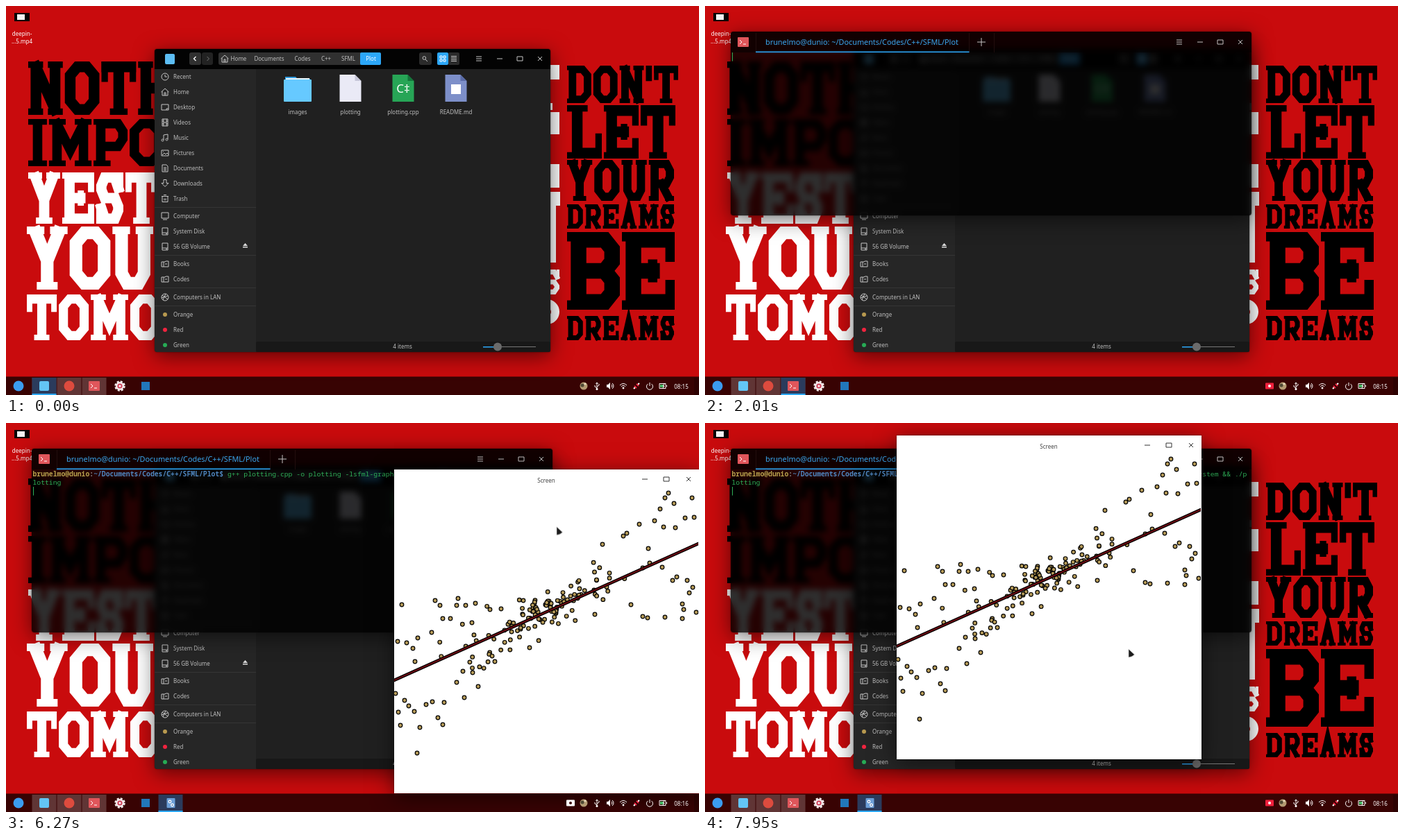
Recreate the animation shown at these times as an HTML page with a canvas. Size 998 px wide and 561 px high, loop 8000 ms.

```html
<!DOCTYPE html>
<html lang="en">
<head>
<meta charset="utf-8">
<title>Desktop plotting session</title>
<style>
html, body { margin: 0; width: 100%; height: 100%; overflow: hidden; background: #c90b0d; }
#stage { position: absolute; left: 0; top: 0; width: 998px; height: 561px; overflow: hidden; }
#stage > * { position: absolute; left: 0; top: 0; }
svg { display: block; overflow: visible; }
text { font: 8px "Noto Sans", "Open Sans", sans-serif; fill: #bdbdbd; white-space: pre; }
.mid { text-anchor: middle; }
.line { fill: none; stroke: #c4c4c4; stroke-width: 1; }
.mono { font: 9.74px "Noto Sans Mono", "DejaVu Sans Mono", monospace; fill: #2fae57; }
.bold { font-weight: bold; }
#stage > .panel { border-radius: 4px; box-shadow: 0 6px 30px rgba(0,0,0,.55), 0 0 2px rgba(0,0,0,.6); }
#files { left: 214px; top: 62px; width: 570px; height: 437px; background: #202020; }
#glass { left: 37px; top: 37px; width: 750px; height: 265px; background: rgba(0,0,0,.82); backdrop-filter: blur(4px); }
#plot { width: 438.5px; height: 467px; background: #fff; transform-origin: 50% 50%; }
#stage > #plot { border-radius: 0; }
#plot > * { position: absolute; left: 0; top: 0; }
#menu text { fill: #222; }
#menu .on text { fill: #fff; }
#menu .off { fill: #6b6e6b; }
</style>
</head>
<body>
<svg width="0" height="0" style="position:absolute"><defs>
  <path id="clock" d="M-5 0a5 5 0 1 0 10 0a5 5 0 1 0-10 0M0-3V0H3"/>
  <path id="home" d="M-5.5 0L0-5L5.5 0M-4-1V5H4V-1M-1 5V1H1V5"/>
  <path id="desktop" d="M-5-4H5V4H-5ZM2 4V2H5"/>
  <path id="film" d="M-4-5H4V5H-4ZM-2-5V5M2-5V5M-2 0H2M-4-2H-2M-4 2H-2M2-2H4M2 2H4"/>
  <path id="note" d="M-2 3V-4L4-5V2M-5 3.5a1.5 1.5 0 1 0 3 0a1.5 1.5 0 1 0-3 0M1 2.5a1.5 1.5 0 1 0 3 0a1.5 1.5 0 1 0-3 0"/>
  <path id="image" d="M-5-4H5V4H-5ZM-4 3L-1 0L1 2L3 0L5 2M-3-2h1"/>
  <path id="page" d="M-4-5H2L4-3V5H-4ZM-2-1H2M-2 1H2M-2 3H2"/>
  <path id="down" d="M-2-5H2V0H5L0 5L-5 0H-2Z"/>
  <path id="bin" d="M-5-3H5M-4-3V5H4V-3M-2-5H2M-1 0V3M1 0V3"/>
  <path id="screen" d="M-5-5H5V3H-5ZM-3 5H3"/>
  <path id="disk" d="M-4-5H4V5H-4ZM-4 2H4M1 3.5H3"/>
  <path id="folder" d="M-5-3H0L1-4H5V4H-5ZM-2-3V4M0 0H3"/>
  <path id="globe" d="M-5 0a5 5 0 1 0 10 0a5 5 0 1 0-10 0M-4-3L4 3M-3 4L1-5M-5 1L4-2"/>
  <path id="bars" d="M-4-3H4M-4 0H4M-4 3H4"/>
  <path id="min" d="M-4 0H4"/>
  <path id="max" d="M-4-3H4V3H-4Z"/>
  <path id="close" d="M-3-3L3 3M3-3L-3 3"/>
  <path id="right" d="M-1.5-3L1.5 0L-1.5 3"/>
</defs></svg>
<div id="stage">
  <canvas id="wall" width="998" height="561"></canvas>
  <svg id="desk" width="998" height="561"></svg>
  <div id="files" class="panel"></div>
  <svg id="fileView" width="998" height="561"></svg>
  <svg id="menu" width="998" height="561"></svg>
  <div id="glass" class="panel term"></div>
  <svg id="shell" class="term" width="998" height="561"></svg>
  <div id="plot" class="panel">
    <canvas width="438" height="467"></canvas>
    <svg width="438" height="467"></svg>
  </div>
  <svg id="dock" width="998" height="561"></svg>
  <svg id="mouse" width="1" height="1">
    <path class="pointer" d="M0 0V12Q5 11.5 8.5 8Z" fill="#1c1c1c" stroke="#ddd" stroke-width=".6"/>
    <path class="mover" d="M-6 0H6M0-6V6M-4-2L-6 0L-4 2M4-2L6 0L4 2M-2-4L0-6L2-4M-2 4L0 6L2 4" fill="none" stroke="#111" stroke-width="1.8"/>
  </svg>
</div>
<script>
const $ = s => document.querySelector(s);
const BLUE = '#2ca7f8';
const rect = (x, y, w, h, fill, r = 0) => `<rect x="${x}" y="${y}" width="${w}" height="${h}" fill="${fill}" rx="${r}"/>`;
const dot = (x, y, r, fill) => `<circle cx="${x}" cy="${y}" r="${r}" fill="${fill}"/>`;
const label = (x, y, s, cls = '', extra = '') => `<text x="${x}" y="${y + 3}" class="${cls}" ${extra}>${s}</text>`;
const icon = (id, x, y, extra = '') => `<use href="#${id}" x="${x}" y="${y}" class="line" ${extra}/>`;
const path = (d, x, y, extra = '') => `<path d="${d}" transform="translate(${x} ${y})" class="line" ${extra}/>`;
const promptIcon = (x, y) => rect(x - 8, y - 7, 16, 14, '#e0565b', 1) +
  path('M-5-3L-2 0L-5 3M0 3H4', x, y, 'style="stroke:#fff"');

/* ---------- wallpaper lettering ---------- */
const stem = 'M1 0V10', twin = stem + 'M9 0V10', bowl = 'M1 0H8L10 2V4L8 6H1';
const strokes = {
  N: twin + 'M1 0L9 10', H: twin + 'M1 5H9', M: twin + 'M1 0L5 7L9 0',
  O: 'M3 0H7L10 2V8L7 10H3L0 8V2Z', D: 'M1 0V10H7L10 8V2L7 0Z',
  T: 'M0 0H10M5 0V10', I: 'M5 0V10', L: 'M2 0V10H10',
  P: stem + bowl, R: stem + bowl + 'M5 6L9 10',
  B: stem + 'M1 0H8L10 1.5V3.5L8 5L10 6.5V8.5L8 10H1M1 5H8',
  E: stem + 'M1 0H10M1 5H6M1 10H10', A: 'M1 10L5 0L9 10M3 7H7',
  S: 'M10 2.5L8 0H2L0 2V3L2 5H8L10 7V8L8 10H2L0 7.5',
  U: 'M1 0V8L3 10H7L9 8V0', Y: 'M1 0L5 5.5L9 0M5 5.5V10', "'": 'M5 0V2L4 3'
};
const tops = 'M0 0H3M7 0H10', feet = 'M0 10H3M7 10H10', left = 'M0 0H2M0 10H2', base = 'M3 10H7';
const serifs = {
  N: tops + feet, H: tops + feet, M: tops + feet, A: feet, U: tops, Y: tops + base,
  T: 'M0 0V3M10 0V3' + base, I: 'M0 0H10M0 10H10', L: 'M0 0H5M0 10H2M10 10V6',
  P: left + 'M0 10H4', R: left + 'M8 10H10', B: left, D: left,
  E: left + 'M10 0V3M10 10V7M6 4V6', S: 'M10 0V3M0 10V7'
};
const span = { I: .55, M: 1.25, S: .85, "'": .25 };
const wall = $('#wall').getContext('2d');

function inkGlyph(d, x, y, w, h, weight) {
  const p = new Path2D(), m = new DOMMatrix([(w - weight) / 10, 0, 0, (h - weight) / 10, x + weight / 2, y + weight / 2]);
  p.addPath(new Path2D(d), m);
  wall.lineWidth = weight;
  wall.stroke(p);
}
function letterRow(word, x, y, right, bottom, color) {
  const gap = 3, h = bottom - y, units = [...word].map(c => span[c] || 1);
  const unit = (right - x - gap * (word.length - 1)) / units.reduce((a, b) => a + b);
  wall.strokeStyle = color;
  wall.lineCap = 'square';
  [...word].forEach((c, i) => {
    const w = unit * units[i];
    inkGlyph(strokes[c], x, y, w, h, Math.min(h * .2, w));
    if (serifs[c]) inkGlyph(serifs[c], x, y, w, h, h * .12);
    x += w + gap;
  });
}
wall.fillStyle = '#c90b0d';
wall.fillRect(0, 0, 998, 561);
letterRow('NOTH', 32, 80, 240, 157, '#000');
letterRow('IMPO', 32, 163, 227, 231, '#000');
letterRow('YEST', 32, 240, 218, 314, '#fff');
letterRow('YOU', 30, 318, 212, 409, '#fff');
letterRow('TOMO', 30, 416, 222, 482, '#fff');
letterRow("DON'T", 808, 86, 968, 140, '#000');
letterRow('LET', 808, 143, 964, 220, '#000');
letterRow('YOUR', 808, 222, 962, 281, '#000');
letterRow('DREAMS', 808, 286, 962, 321, '#000');
letterRow('BE', 808, 326, 963, 438, '#000');
letterRow('DREAMS', 808, 447, 962, 482, '#000');
letterRow('S', 770, 380, 797, 416, '#fff');
wall.fillStyle = '#fff';
for (const [y, w, h] of [[85, 17, 21], [140, 7, 10], [153, 17, 32], [228, 17, 34], [268, 18, 20], [288, 12, 82]])
  wall.fillRect(780, y, w, h);
wall.lineWidth = 12;
wall.beginPath();
wall.arc(779, 441, 12, -1.6, 1.2);
wall.stroke();

$('#desk').innerHTML = rect(12, 10, 22, 12, '#050505') + rect(16, 12, 11, 8, '#f4f4f4') +
  label(23, 40, 'deepin-', 'mid', 'style="fill:#fff"') + label(23, 51, '...5.mp4', 'mid', 'style="fill:#fff"');

/* ---------- file manager ---------- */
const controls = (xs, y, ink = '#c4c4c4') =>
  ['bars', 'min', 'max', 'close'].slice(-xs.length).map((id, i) => icon(id, xs[i], y, `style="stroke:${ink}"`)).join('');
const places = [
  ['Recent', 102, 'clock'], ['Home', 124, 'home'], ['Desktop', 146, 'desktop'], ['Videos', 168, 'film'],
  ['Music', 190, 'note'], ['Pictures', 212, 'image'], ['Documents', 234, 'page'], ['Downloads', 255.5, 'down'],
  ['Trash', 277.5, 'bin'], ['Computer', 303, 'screen'], ['System Disk', 325, 'disk'], ['56 GB Volume', 347, 'disk'],
  ['Books', 372, 'folder'], ['Codes', 394, 'folder'], ['Computers in LAN', 420, 'globe']
];
const tags = [['Orange', 445, '#b8994f'], ['Red', 467, '#f0243f'], ['Green', 489, '#27ab55']];
const crumbs = [['Home', 335], ['Documents', 379], ['Codes', 427], ['C++', 461], ['SFML', 493], ['Plot', 525.5]];
const sheet = (x, fill, fold) => `<path d="M${x} 99h22l9 9v30h-31z" fill="${fill}"/><path d="M${x + 22} 99v9h9z" fill="${fold}"/>`;

$('#fileView').innerHTML =
  `<path d="M214 499V66q0-4 4-4H780q4 0 4 4V91H214Z" fill="#030303"/>` +
  `<path d="M214 91H360V499H218q-4 0-4-4Z" fill="#262626"/>` +
  rect(360, 484, 424, 15, '#181818', 2) +
  rect(229, 69, 14, 15, '#5cbdf3', 2) +
  rect(264, 67, 17, 18, '#303030', 3) + rect(282, 67, 16, 18, '#222', 3) +
  path('M1.5-3L-1.5 0L1.5 3', 272, 76, 'style="stroke:#fff;stroke-width:1.3"') + icon('right', 291, 76, 'style="stroke:#777"') +
  rect(306, 67, 234, 18, '#303030', 3) + rect(510, 67, 30, 18, BLUE, 2) + icon('home', 315, 76) +
  crumbs.map(([s, x]) => label(x, 76, s, 'mid', s === 'Plot' ? 'style="fill:#fff"' : '')).join('') +
  rect(595, 67, 18, 18, '#2b2b2b', 3) + path('M-3-1a2.3 2.3 0 1 0 4.6 0a2.3 2.3 0 1 0-4.6 0M1 1L4 4', 603, 76) +
  rect(621, 67, 16, 18, BLUE, 2) + rect(637, 67, 16, 18, '#2b2b2b', 2) +
  path('M-4-4H-1V-1H-4ZM1-4H4V-1H1ZM-4 1H-1V4H-4ZM1 1H4V4H1Z', 629, 76, 'style="stroke:#fff"') +
  path('M-4-3.5H4M-4-1.2H4M-4 1.2H4M-4 3.5H4', 645, 76) + controls([681, 711, 740, 769], 76) +
  places.map(([s, y, id]) => icon(id, 229, y) + label(241, y, s)).join('') +
  tags.map(([s, y, c]) => dot(229, y, 3, c) + label(241, y, s)).join('') +
  [290, 359, 406, 432].map(y => rect(214, y, 146, 1, '#353535')).join('') +
  `<path d="M341 346L344.500 342L348 346ZM341 347h7v1.500h-7z" fill="#ddd"/>` +
  `<path d="M402 102h15l3 3h18v5h-36z" fill="#2f9be0"/>` + rect(403, 104, 34, 4, '#e8f6ff') + rect(400, 106, 40, 32, '#66c9ff', 1) +
  sheet(480.5, '#eaeaf6', '#c6c6d8') + sheet(556.5, '#27a556', '#14753a') + sheet(632.5, '#7d8fc9', '#596aa6') +
  label(572, 122, 'C‡', 'mid', 'style="font-size:17px;fill:#fff"') +
  rect(641, 113, 14, 14, '#fff') +
  [['images', 420], ['plotting', 496], ['plotting.cpp', 572], ['README.md', 648]].map(([s, x]) => label(x, 153, s, 'mid')).join('') +
  label(571, 491, '4 items', 'mid') + rect(687, 491, 76, 1, '#777') + rect(687, 491, 20, 1.5, BLUE) + dot(708, 491.5, 6, '#6b6b6b');

/* ---------- context menu ---------- */
const entries = [['New folder', 264], ['New document', 280, 1], ['Display as', 300, 1], ['Sort by', 316, 1],
  ['Open in new window as admin', 332], ['Open in terminal', 348], ['Paste', 368], ['Select all', 384], ['Properties', 404]];
$('#menu').innerHTML = `<g class="body">` + rect(506, 253, 157.5, 161, '#979a97', 3) +
  entries.map(([s, y, more], i) => (s === 'Paste' ? label(526, y, s, '', 'style="fill:#6b6e6b"') : label(526, y, s)) +
    (more ? icon('right', 657, y, 'style="stroke:#222"') : '') +
    (i < 6 ? `<g class="on row${i}">${rect(506, y - 8, 157.5, 16, BLUE)}${label(526, y, s)}</g>` : '')).join('') +
  `</g><g class="click">${dot(506, 253, 8, 'rgba(90,180,245,.55)')}</g>`;

/* ---------- terminal ---------- */
const user = 'brunelmo@dunio', cwd = '~/Documents/Codes/C++/SFML/Plot';
const mono = (y, s, cls, x = 38.5) => `<text class="mono ${cls}" x="${x}" y="${y}">${s}</text>`;
$('#shell').innerHTML =
  `<path d="M37 67V41q0-4 4-4H783q4 0 4 4V67Z" fill="rgba(0,0,0,.5)"/>` + promptIcon(55, 52) +
  [73, 380, 416].map(x => rect(x, 39, .7, 28, '#2a1414')).join('') + rect(73, 65.5, 307.5, 1.6, BLUE) +
  `<text x="87" y="56" style="font-size:10.87px;fill:#3aa6ee">${user}: ${cwd}</text>` +
  path('M-6 0H6M0-6V6', 398, 52) + controls([683, 713, 742, 771], 52) +
  `<g class="prompt">` + mono(76.5, `${user}<tspan fill="#8a8a8a">:</tspan><tspan fill="#4f86c0">${cwd}$</tspan>`, 'bold', 38.5).replace('class=', 'style="fill:#b59f4c" class=') + `</g>` +
  `<g class="short">${mono(76.5, './plotting', '', 319)}</g>` +
  `<g class="full">` + mono(76.5, 'g++ plotting.cpp -o plotting -lsfml-graphics -lsfml-window -lsfml-system &amp;&amp; ./p', '', 319) +
  mono(89, 'lotting', '') + `</g>` + `<g class="caret">${rect(0, 0, 1, 12.5, '#2fae57')}</g>`;

/* ---------- scatter plot ---------- */
const outliers = [
  11,195, 59,189, 66,196, 92,186, 90,196, 33,409, 6,350, 9,369, 15,333, 21,341, 29,349, 37,372,
  46,339, 55,335, 72,336, 63,358, 70,368, 101,329, 121,313, 90,307, 99,291, 113,293, 5,248, 18,250,
  27,258, 34,243, 30,277, 2,323, 54,235, 70,215, 81,215, 103,196, 117,193, 138,202, 154,201, 112,221,
  195,257, 145,277, 429,41, 432,69, 419,70, 403,49, 395,34, 390,41, 383,57, 375,74, 388,83, 405,84,
  353,79, 335,92, 330,96, 300,108, 366,114, 368,135, 358,142, 407,155, 401,160, 422,160, 425,178,
  430,170, 415,194, 417,202, 415,215, 435,206, 358,212, 365,214, 390,213, 386,141, 341,195, 289,209
];
const chart = $('#plot canvas').getContext('2d');
let seed = 11;
const random = () => (seed = seed * 16807 % 2147483647) / 2147483647;
const fit = x => 304 - x * 197 / 438;
function mark(x, y) {
  chart.beginPath();
  chart.arc(x, y, 2.8, 0, 7);
  chart.fill();
  chart.stroke();
}
chart.fillStyle = '#b59a58';
chart.strokeStyle = '#000';
chart.lineWidth = 1.2;
for (let i = 0; i < outliers.length; i += 2) mark(outliers[i], outliers[i + 1]);
for (let i = 0; i < 118; i++) {
  const x = 45 + 310 * (random() + random() + .6 * i / 118) / 2.6;
  mark(x, fit(x) + (random() + random() - 1) * (34 + 70 * Math.abs(x / 438 - .55)));
}
for (const [width, color] of [[4.4, '#0a0000'], [1.4, '#8a0d18']]) {
  chart.strokeStyle = color;
  chart.lineWidth = width;
  chart.beginPath();
  chart.moveTo(-2, fit(-2));
  chart.lineTo(440, fit(440));
  chart.stroke();
}
$('#plot svg').innerHTML = label(219, 16, 'Screen', 'mid', 'style="fill:#444"') + controls([361, 392, 424], 14, '#333') +
  `<g class="grab">${dot(230, 15, 6, 'rgba(90,180,245,.55)')}</g>`;

/* ---------- dock ---------- */
const tile = x => rect(x - 17.5, 536, 35, 25, 'rgba(255,255,255,.2)');
const active = (x, cls) => `<g class="${cls}">${rect(x - 17.5, 536, 35, 25, '#2b3b5c')}${rect(x - 17.5, 559, 35, 2, BLUE)}</g>`;
const camera = (cls, fill, lens) => `<g class="${cls}">${rect(807, 543.5, 12, 9, fill, 1)}${dot(813, 548, 2, lens)}</g>`;
const white = 'style="stroke:#fff"';
$('#dock').innerHTML = rect(0, 534.5, 998, 27, 'rgba(0,0,0,.72)') + rect(991, 536, 7, 25, 'rgba(0,0,0,.2)') +
  dot(18, 548, 7.5, '#3b9cf0') + tile(55) + tile(91) + tile(127) +
  active(55, 'filesOn') + active(127, 'shellOn') +
  rect(48, 541, 14, 14, '#63c5f5', 2) + dot(91, 548, 7.5, '#dd4b3e') + promptIcon(127, 548) +
  dot(164, 548, 6, '#f3e9ea') + `<circle cx="164" cy="548" r="6.500" fill="none" stroke="#f3e9ea" stroke-width="2.500" stroke-dasharray="3 2.100"/>` +
  dot(164, 548, 3.6, '#d0445c') + dot(164, 548, 1.6, '#fff') + rect(195, 542, 12, 12, '#2277bb') +
  `<g class="plotOn">${active(237, '')}${rect(231.5, 541, 12, 14, '#6d9fd8', 1)}${dot(236, 546, 2.4, '#fff')}${dot(239.5, 551, 2.4, '#fff')}${dot(236, 546, 1, '#3c68a8')}${dot(239.5, 551, 1, '#3c68a8')}</g>` +
  camera('recWhite', '#fff', '#3a0405') + camera('recRed', '#f0203c', '#fff') +
  dot(832, 548, 5.5, '#b49a72') + dot(830, 547, 2.5, '#4f4a35') + dot(834, 545, 1.5, '#e8dcc0') +
  path('M0 5V-5M-1.500-3L0-5L1.500-3M0 3L-3 1V-1M0 1L3-1V-3', 851, 548, white) + dot(851, 552.5, 1.5, '#fff') +
  `<path d="M865 546h2l3-3v10l-3-3h-2z" fill="#fff"/>` + path('M2-2Q4 0 2 2M3-4Q7 0 3 4', 870, 548, white) +
  path('M-5-1Q0-6 5-1M-3 1Q0-2.500 3 1', 889, 548, white) + dot(889, 551, 1.4, '#fff') +
  path('M-4 4L-1 1M1-1L4-4', 908, 548, 'style="stroke:#fff;stroke-width:2"') + path('M-3 0L0 3M0-3L3 0', 908, 548, 'style="stroke:#f0203c;stroke-width:2"') +
  path('M-2.500-3A4.500 4.500 0 1 0 2.500-3M0-5V0', 927, 548, white) +
  path('M-5-3.500H4V3.500H-5ZM5.500-1V1', 946, 548, white) + rect(942, 546, 5, 4, '#42b861') + path('M1-3L-1 0H1L-1 3', 947, 548, white) +
  ['15', '16'].map(m => `<g class="at${m}"><text x="972.500" y="551.500" class="mid" style="fill:#fff">08:${m}</text></g>`).join('');

/* ---------- timeline ---------- */
const LOOP = 8000;
let css = '', count = 0;
function track(selector, steps, easing = 'linear') {
  const name = 'k' + count++;
  const frames = [...steps, [LOOP, steps[steps.length - 1][1]]];
  css += `@keyframes ${name}{${frames.map(([t, rule]) => `${t * 100 / LOOP}%{${rule}}`).join('')}}` +
    `${selector}{animation:${name} ${LOOP}ms ${easing} infinite}`;
}
const show = (selector, ...ranges) => track(selector,
  [[0, 'opacity:0'], ...ranges.flatMap(([a, b]) => b < LOOP ? [[a, 'opacity:1'], [b, 'opacity:0']] : [[a, 'opacity:1']])], 'step-end');
const move = (x, y, more = '') => `transform:translate(${x}px,${y}px)${more}`;

show('.click', [630, 860]);
show('#menu .body', [690, 1760]);
const hover = [740, 860, 930, 1000, 1080, 1240, 1760];
hover.slice(0, -1).forEach((t, i) => show('.row' + i, [t, hover[i + 1]]));

track('.term', [[0, 'opacity:0'], [1740, 'opacity:0'], [1960, 'opacity:1']]);
show('.prompt', [2060, LOOP]);
show('.short', [2470, 2830]);
show('.full', [2830, LOOP]);
track('.caret', [
  [0, move(39, 67)], [2060, move(319, 67)], [2470, move(377.5, 67)], [2830, move(85.2, 79.5)],
  [3420, move(85.2, 79.5) + ';opacity:0'], [4020, move(85.2, 79.5) + ';opacity:1'],
  [4120, move(39, 92) + ';opacity:1'], [4640, move(39, 92) + ';opacity:0'], [4900, move(39, 92) + ';opacity:1']
].map(([t, rule]) => [t, rule.includes('opacity') ? rule : rule + ';opacity:1']), 'step-end');

track('#plot', [
  [0, move(559, 67, ' scale(.95);opacity:0')], [4830, move(559, 67, ' scale(.95);opacity:0')],
  [5050, move(559, 67, ' scale(1);opacity:1')], [6450, move(559, 67, ' scale(1);opacity:1')],
  [6820, move(360, 44, ' scale(1);opacity:1')], [6990, move(276, 18, ' scale(1);opacity:1')]
]);
show('.grab', [6400, 7160]);
track('#mouse', [
  [0, move(815, 235)], [6020, move(815, 235)], [6270, move(793, 150)], [6450, move(788, 80)],
  [6820, move(565, 54)], [6990, move(505, 32)], [7160, move(505, 32)], [7950, move(610, 326)]
]);
show('.pointer', [6020, 6450], [7160, LOOP]);
show('.mover', [6450, 7160]);

show('.filesOn', [0, 1760]);
show('.shellOn', [1760, 4880]);
show('.plotOn', [4880, LOOP]);
show('.at15', [0, 4880]);
show('.at16', [4880, LOOP]);
show('.recRed', [90, 880], [1760, 2470], [3250, 4070], [4880, 5670], [6470, 7270], [7940, LOOP]);
show('.recWhite', [880, 1760], [2470, 3250], [4070, 4880], [5670, 6470], [7270, 7940]);

document.head.appendChild(document.createElement('style')).textContent = css;
</script>
</body>
</html>
```
